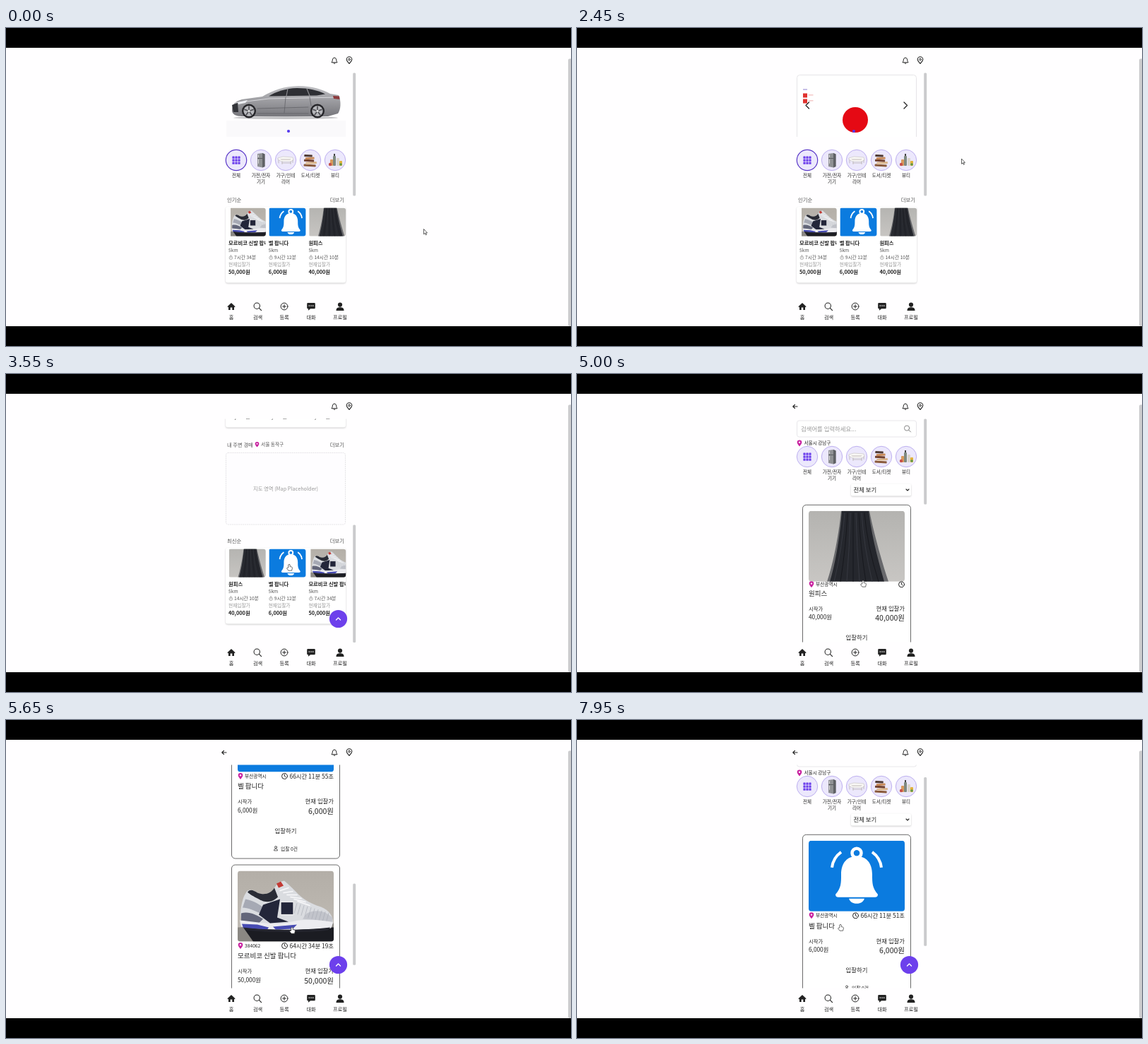
These frames come from a looping animation (800 by 450 pixels, 8 s). An HTML page:

```html
<!DOCTYPE html>
<html>
<head>
<meta charset="utf-8">
<title>Auction app</title>
<style>
  html, body { margin: 0; width: 100%; height: 100%; overflow: hidden; background: #000; }
  svg { display: block; }
  text { font-family: "Noto Sans CJK KR", "Noto Sans KR", "Noto Sans CJK", "Noto Sans", sans-serif; }
  .soft { filter: drop-shadow(0 1px 1.2px rgba(0, 0, 0, .2)); }
  .line { fill: none; stroke: #222; stroke-linecap: round; stroke-linejoin: round; }
</style>
</head>
<body>
<svg id="stage" width="800" height="450" viewBox="0 0 800 450"></svg>
<script>
const LOOP = 8000, STEP = 50;
const INK = '#222', GREY = '#555', PALE = '#999', PURPLE = '#6d40ec', PINK = '#c8219f';

// y is the visual middle of the line
const text = (x, y, s, size, fill = INK, more = '') =>
  `<text x="${x}" y="${y + size * .37}" font-size="${size}" fill="${fill}" ${more}>${s}</text>`;
const END = 'text-anchor="end"', MID = 'text-anchor="middle"', BOLD = 'font-weight="700"';
const at = (x, y, body, more = '') => `<g transform="translate(${x} ${y})" ${more}>${body}</g>`;
const use = (id, x, y, k = 1) => `<use href="#${id}" transform="translate(${x} ${y}) scale(${k})"/>`;
const path = (d, fill, more = '') => `<path d="${d}" fill="${fill}" ${more}/>`;
const rect = (x, y, w, h, fill, more = '') =>
  `<rect x="${x}" y="${y}" width="${w}" height="${h}" fill="${fill}" ${more}/>`;
const dot = (x, y, r, fill, more = '') => `<circle cx="${x}" cy="${y}" r="${r}" fill="${fill}" ${more}/>`;
const line = (d, w = 1, more = '') => `<path class="line" d="${d}" stroke-width="${w}" ${more}/>`;
const tint = color => `style="stroke:${color}"`;
const range = n => [...Array(n).keys()];

const items = {
  dress: { name: '원피스', price: '40,000원', left: '14시간 10분', place: '부산광역시', clock: [95, 10, 33] },
  bell: { name: '벨 팝니다', price: '6,000원', left: '9시간 12분', place: '부산광역시', clock: [66, 11, 55] },
  shoe: { name: '모르비코 신발 팝니다', price: '50,000원', left: '7시간 34분', place: '384062', clock: [64, 34, 19] }
};

const pictures = `
<g id="dress">
  ${rect(0, 0, 136, 100, 'url(#wall)')}
  ${path('M46 0H86C92 30 103 70 113 100H26C36 70 43 30 46 0Z', '#4a4b50', 'opacity=".75"')}
  ${path('M47 0H85C89 35 99 72 107 100H30C39 70 45 30 47 0Z', '#25272d')}
  ${range(8).map(i => line(`M${51 + i * 4} 3Q${48 + i * 5} 50 ${36 + i * 9} 100`, 1,
    tint(i % 2 ? '#17181d' : '#363840'))).join('')}
</g>
<g id="bell">
  ${rect(0, 0, 136, 100, '#0b7bdf')}
  <circle cx="68" cy="17.500" r="6.500" fill="none" stroke="#fff" stroke-width="4.500"/>
  ${path('M38 76C46 67 46 60 46 48C46 31 55 22 68 22C81 22 90 31 90 48C90 60 90 67 98 76Q98 80 94 80H42Q38 80 38 76Z', '#fff')}
  ${path('M57 82H79C77 87 73 89 68 89C63 89 59 87 57 82Z', '#fff')}
  <path d="M33 38C34 29 39 21 46 16M103 38C102 29 97 21 90 16" fill="none" stroke="#fff" stroke-width="4"/>
</g>
<g id="shoe">
  ${rect(0, 0, 136, 100, 'url(#floor)')}
  ${path('M0 80L136 74V100H0Z', '#8b8883')}
  ${path('M8 80H136V100H22Z', '#1b1c22')}
  ${path('M4 60C5 46 8 36 13 29C18 25 23 28 28 31C38 35 47 32 52 24L58 16L66 14C72 19 77 24 82 29C92 40 104 47 118 51C130 56 135 64 135 73L133 80L6 76Z', '#dadce0')}
  ${path('M14 30C18 25 23 28 28 31C38 35 47 32 52 24L57 37C48 46 38 45 30 40C22 36 17 33 14 30Z', '#2a2c36')}
  ${path('M11 40C22 42 32 48 40 54L36 62C24 56 14 52 7 52Z', '#a6a9b4')}
  ${path('M36 48L60 40L56 66L72 72L46 74L30 62Z', '#23263a')}
  ${path('M5 60C16 57 26 62 36 68L30 74L5 71Z', '#63667a')}
  ${path('M98 60C110 54 124 56 134 66L134 72L92 68Z', '#c2c4cb')}
  ${path('M55 18L61 15L65 21L58 24Z', '#c23a34')}
  ${range(6).map(i => line(`M${60 + i * 5} ${28 + i * 3}L${72 + i * 6} ${24 + i * 5}`, 1.6, tint('#f8f8fa'))).join('')}
  ${range(10).map(i => line(`M${84 + i * 5} ${46 + i * 1.500}l-4 14`, .6, tint('#a5a8b2'))).join('')}
  ${rect(61, 44, 18, 18, '#23263a', 'stroke="#eee" stroke-width="1.200"')}
  ${path('M3 70C26 72 52 78 76 72C98 67 122 70 135 73L132 81C104 83 80 84 60 83C40 83 20 82 5 79Z', '#ececf0')}
  ${path('M6 75L28 76L44 80L42 83L8 81ZM50 79L84 76L78 82L54 83Z', '#474bb2')}
  ${path('M8 80C44 85 96 84 131 80L128 84C92 88 40 87 12 84Z', '#24252e')}
</g>
<g id="car">
  <ellipse cx="396" cy="127" rx="74" ry="2" fill="#c4c4c6"/>
  ${path('M320 117C320 108 324 104 334 101L363 97C378 88 394 82.500 414 82C434 82 448 87 459 93L471 95C475 104 474 116 470 121L456 125H334C326 125 320 122 320 117Z', 'url(#silver)')}
  ${path('M372 96.500C382 90 396 85.500 412 85C429 85 441 88 452 93.500L440 95.500Z', '#2e2f34')}
  ${line('M399 86L397 96M426 86L430 96', 1.2, tint('#8d8d92'))}
  ${line('M324 106L372 100L471 98', 1, tint('#d8d8dc'))}
  ${line('M356 121H428M396 98L394 120M430 98L432 110M356 114L428 112', .7, tint('#5c5c62'))}
  ${path('M320 109L328 106L329 119L322 119Z', '#333439')}
  ${path('M328 105L342 102L339 106L329 108Z', '#eceef2')}
  ${path('M463 96L472 96.500L472.500 101L464 100Z', '#8d3a3d')}
  ${[344, 441].map(x => dot(x, 117.5, 10, '#242428') + dot(x, 117.5, 7.6, '#b5b6ba') +
    range(5).map(i => `<path d="M${x} 117.500v-7" stroke="#4b4b50" stroke-width="1.600" transform="rotate(${i * 72} ${x} 117.500)"/>`).join('') +
    dot(x, 117.5, 1.7, '#ddd')).join('')}
</g>`;

const icons = `
<g id="pin">${path('M0 4.500C-2 2-3.300.5-3.300-1.200A3.300 3.300 0 0 1 3.300-1.200C3.300.5 2 2 0 4.500Z', PINK)}${dot(0, -1.2, 1.2, '#fff')}</g>
<g id="clock"><circle r="4" class="line" stroke-width="1"/>${line('M0-2.400V.2L1.800 1.200', .9)}</g>
<g id="lens"><circle cx="-1" cy="-1" r="4" class="line" stroke-width="1"/>${line('M2 2L5 5', 1.1)}</g>
<g id="arrow">${path('M0 0V7.300L1.700 5.800L2.900 8.400L4 7.900L2.900 5.400H5Z', '#fff', 'stroke="#222" stroke-width=".7"')}</g>
<g id="hand">${path('M-1.200 5V1Q0-.8 1.200 1V3.500L3.800 4.200Q4.600 4.500 4.400 5.600L3.600 9.200H-1L-3.300 6.300Q-3.400 5.200-2.300 5.200Z', '#fff', 'stroke="#222" stroke-width=".65"')}</g>
<g id="person">${dot(0, -2.7, 3.1, INK)}${path('M-5.500 5.800C-5.500 1.500-3 .9 0 .9S5.500 1.500 5.500 5.800Z', INK)}</g>`;

const goods = [
  range(9).map(i => rect(-5.6 + i % 3 * 4, -5.4 + (i / 3 | 0) * 4, 3.2, 3.2, PURPLE, 'rx=".4"')).join(''),
  path('M-5-9L2-10L5.500-8.500V9L2 10.500L-5 9Z', '#8f9194') + path('M2-10L5.500-8.500V9L2 10.500Z', '#5f6165') +
    rect(-5, -3, 7, .8, '#4f5155') + rect(-4, -7.5, .8, 3.5, '#eee') + rect(-4, -1.2, .8, 6, '#eee'),
  path('M-11-3L-4-5L10-4L11 0L7 2L-6 2L-11-1Z', '#f9f8f6', 'stroke="#c5c1bf" stroke-width=".6"') +
    line('M-10 0V4M-5 2V5.500M7 2V5.500M10 0V3.500M-5 4H7', .8, tint('#b9b4b2')) +
    path('M-8-2L8-2L6 0H-6Z', '#dcd8d6'),
  ['#8a5a3c', '#d9b48a', '#71402e', '#c88a5a', '#4f3a34'].map((c, i) =>
    rect(-9 + i % 2 * 2, 6 - i * 3.4, 17 - i * 1.4, 3, c, `rx=".5" transform="rotate(${i % 2 ? -4 : 3})"`)).join('') +
    rect(-6, 5, 12, .8, '#f4e9da'),
  rect(-7, -1, 4, 9, '#d99a5d', 'rx="1"') + rect(-3, -6, 4, 14, '#7f8a80', 'rx="1"') + rect(-2, -9, 2, 3, '#444') +
    rect(2, -3, 4, 11, '#d9d4c8', 'rx="1"') + rect(6, 1, 4, 7, '#e2b23c', 'rx="1"') + dot(-7, 6, 2.2, '#c6504a') + dot(8, 6, 1.8, '#5d9a4b')
];
const labels = [['전체'], ['가전/전자', '기기'], ['가구/인테', '리어'], ['도서/티켓'], ['뷰티']];
const categories = (y, selected) => labels.map((rows, i) => at(326 + 35 * i, y,
  dot(0, 0, 14.7, '#ece8fc', i === selected ? 'stroke="#5a37c8" stroke-width="1.200"' : 'stroke="#b7a8ee" stroke-width=".9"') +
  goods[i] + rows.map((r, n) => text(0, 22 + n * 8.2, r, 6.5, INK, MID)).join(''))).join('');

const thumb = (id, i) => {
  const p = items[id];
  return at(315 + 56.7 * i, 254.7, `
    <g clip-path="url(#thumbClip)">${use(id, id === 'shoe' ? 3 : 1, -2.7, .45)}</g>
    ${text(0, 49.3, p.name, 7.3, INK, BOLD)}${text(0, 60, '5km', 6.7, GREY)}
    <circle cx="3.400" cy="70.500" r="2.300" fill="none" stroke="#777" stroke-width=".6"/>
    ${line('M3.400 69.200V70.600M2.700 67.200H4.100', .6, tint('#777'))}
    ${text(8, 70, p.left, 6.7, GREY)}${text(0, 80.2, '현재입찰가', 6.7, PALE)}
    ${text(0, 90.6, p.price, 7.3, INK, BOLD)}`, 'clip-path="url(#itemClip)"');
};
const listing = (y, title, ids) => at(0, y,
  text(313, 243, title, 7.3, GREY) + text(479, 243, '더보기', 7.3, GREY, END) +
  rect(311, 253, 170, 107.500, '#fff', 'rx="3" class="soft"') + ids.map(thumb).join(''));

const home = `
<g clip-path="url(#bannerClip)">
  <g id="slides">
    ${rect(312, 131, 169, 23, '#faf9fb')}<use href="#car"/>
    <g transform="translate(170 0)">
      ${rect(311.5, 66.5, 169, 95, '#fff', 'rx="4" stroke="#e6e4e8"')}
      ${dot(394, 130, 18, '#e50914')}
      ${rect(320, 86.5, 6, 1, '#8d7fd0')}
      ${[92.5, 100.5].map(y => rect(320, y, 6, 6, '#e0322f') + rect(327.5, y + 2, 7, .8, '#eb9a98')).join('')}
    </g>
  </g>
</g>
<circle id="bullet" cy="146" r="2.100" fill="#5437ee"/>
<g id="chevrons">${line('M328.500 105L324 109.500L328.500 114M463 105L467.500 109.500L463 114', 1.3)}</g>
${categories(187, 0)}
${listing(0, '인기순', ['shoe', 'bell', 'dress'])}
${text(313, 385, '내 주변 경매', 7.3, GREY)}${use('pin', 355.5, 384.8, .85)}
${text(361, 385, '서울 동작구', 6.7, GREY)}${text(479, 385, '더보기', 7.3, GREY, END)}
${rect(311.5, 396.500, 169, 101.500, '#fefdff', 'rx="3" stroke="#dedce0" stroke-width=".8" stroke-dasharray="2 1"')}
${text(396, 447, '지도 영역 (Map Placeholder)', 7.3, PALE, MID)}
${listing(278, '최신순', ['dress', 'bell', 'shoe'])}`;

const card = id => {
  const p = items[id];
  return `<g id="card-${id}">
    <rect class="frame" x="319.500" y="0" width="153" rx="5" fill="#fff" stroke="#444" stroke-width=".8"/>
    ${at(328, 8.5, use(id, 0, 0), 'clip-path="url(#photoClip)"')}
    <g class="where">${use('pin', 332, 112.5)}${text(338, 112.5, p.place, 6.7)}
      <g class="dial"><use href="#clock"/></g>${text(464, 112.5, '', 8.4, INK, END + ' class="timer"')}</g>
    <g class="rest">${text(328, 124.700, p.name, 9.5)}
      ${text(328, 146.700, '시작가', 7.3)}${text(328, 159, p.price, 8.3)}
      ${text(464, 146.200, '현재 입찰가', 8.4, INK, END)}${text(464, 160, p.price, 10.5, INK, END)}
      ${text(396, 188, '입찰하기', 8.4, INK, MID)}
      <circle cx="382" cy="211" r="1.500" class="line" stroke-width=".7"/>
      ${line('M379.500 215.500Q379.500 213 382 213T384.500 215.500Z', .7)}
      ${text(389, 213.300, '입찰 0건', 6.8)}</g>
  </g>`;
};
const search = `
${rect(311.5, 66, 169, 23, '#fff', 'rx="3" stroke="#e6e4e8" stroke-width=".9"')}
${text(317, 77.7, '검색어를 입력하세요...', 8.4, PALE)}
<g opacity=".6">${use('lens', 468, 77.5, .9)}</g>
${use('pin', 315, 98)}${text(321.5, 98, '서울시 강남구', 6.6)}
${categories(117, -1)}
${rect(388, 155.500, 85, 17, '#fff', 'rx="2" class="soft"')}
${text(391.5, 164.3, '전체 보기', 8.4)}${line('M466 163L468 165L470 163', 1.1)}
${Object.keys(items).map(card).join('')}`;

const nav = [['홈', 319], ['검색', 356.5], ['등록', 394], ['대화', 432], ['프로필', 473]]
  .map(([s, x]) => text(x, 409, s, 7.2, INK, MID)).join('') +
  at(319, 394, path('M-5.600.3L0-5L5.600.3L4.800 1.200L4 .5V5H1.300V1.500H-1.300V5H-4V.5L-4.800 1.200Z', INK)) +
  use('lens', 356.3, 394.3, 1.05) +
  at(394, 394, '<circle r="4.900" class="line" stroke-width="1"/>' + line('M-2.400 0H2.400M0-2.400V2.400', 1)) +
  at(432, 394, path('M-4.500-5H4.500Q5.800-5 5.800-3.700V2Q5.800 3.200 4.500 3.200H-1L-4 5.800V3.200H-4.500Q-5.800 3.200-5.800 2V-3.700Q-5.800-5-4.500-5Z', INK) +
    [-2.7, 0, 2.7].map(x => dot(x, -.9, .8, '#fff')).join('')) +
  use('person', 473, 394.3);

const header = at(465, 46, line('M-3.800 2.500C-2.600 1-2.800-1-2.400-2Q-1.800-4 0-4T2.400-2C2.800-1 2.600 1 3.800 2.500ZM-1 4Q0 5 1 4', 1)) +
  at(486, 45.5, line('M0 5C-2.500 2-3.800.8-3.800-1A3.800 3.800 0 0 1 3.800-1C3.800.8 2.500 2 0 5Z', 1.1) +
    '<circle cy="-1" r="1.400" class="line" stroke-width=".9"/>') +
  `<g id="back">${line('M312 46H306M308.500 43.300L305.800 46L308.500 48.700', 1.2)}</g>`;

const clip = (id, x, y, w, h, r = 0) => `<clipPath id="${id}">${rect(x, y, w, h, '#000', `rx="${r}"`)}</clipPath>`;
const fade = (id, a, b) => `<linearGradient id="${id}" x2="0" y2="1"><stop stop-color="${a}"/><stop offset="1" stop-color="${b}"/></linearGradient>`;

document.getElementById('stage').innerHTML = `
<defs>
  ${fade('wall', '#b4b3b0', '#c8c6c3')}${fade('floor', '#b3aea7', '#c2bdb6')}${fade('silver', '#c0c0c4', '#77777c')}
  ${clip('view', 300, 63.5, 191, 316)}${clip('bannerClip', 311, 66, 170, 88)}
  ${clip('thumbClip', 0, 0, 52.7, 39.7, 3)}${clip('itemClip', 0, 0, 52.7, 100)}${clip('photoClip', 0, 0, 136, 100, 4)}
  ${pictures}${icons}
</defs>
${rect(0, 28, 800, 394, '#fffeff')}
${rect(796, 43.5, 6, 378.5, '#cdcdcf', 'rx="2"')}
<g clip-path="url(#view)"><g id="home">${home}</g><g id="search">${search}</g></g>
<rect id="thumb" x="491.200" width="4" rx="1.500" fill="#cbcbcd"/>
<g id="up">${dot(470.5, 346.5, 12.6, PURPLE)}${line('M467.500 348L470.500 345L473.500 348', 1.4, tint('#fff'))}</g>
${header}${nav}
<use id="cursor"/>`;

const $ = id => document.getElementById(id);
const set = (el, attrs) => { for (const k in attrs) el.setAttribute(k, attrs[k]); };
const move = (el, x, y) => set(el, { transform: `translate(${x} ${y})` });
const show = (el, on) => set(el, { display: on ? 'inline' : 'none' });
const smooth = p => p * p * (3 - 2 * p);

// keys: [time, value, ...] rows, eased between neighbours
function track(keys, t) {
  const i = keys.findIndex(k => k[0] > t);
  if (i < 0) return keys[keys.length - 1].slice(1);
  if (!i) return keys[0].slice(1);
  const a = keys[i - 1], b = keys[i], p = smooth((t - a[0]) / (b[0] - a[0]));
  return a.slice(1).map((v, n) => v + (b[n + 1] - v) * p);
}

const POINTER = [
  [0, 591.5, 284.5], [2400, 591.5, 284.5], [2450, 544.5, 185], [2550, 544.5, 175.5], [2750, 544.5, 175.5],
  [2800, 545, 172], [2900, 545, 172], [3050, 401, 269], [3800, 401, 269], [4000, 356, 393], [4100, 356, 393],
  [4500, 405, 292], [5000, 405, 292], [5200, 405, 293], [5900, 405, 293], [6300, 405, 177], [6350, 405, 176],
  [6550, 402, 158], [6600, 400, 157], [6750, 352, 123], [7000, 352, 123], [7400, 373, 289]
];
const SCROLL_HOME = [[3000, 0], [3450, 285]];
const SCROLL_SEARCH = [[5000, 0], [5600, 460.3], [5800, 460.3], [6330, 1.3], [6350, 1.3], [6400, 0], [7800, 0], [7950, 23], [8000, 34]];
const SLIDE = [[750, 0], [1050, -170]];

function drawCards(t, filtered, timed) {
  const grow = timed ? 4 : 0, ticks = Math.floor((t - 5450) / 525);
  Object.keys(items).forEach((id, i) => {
    const g = $('card-' + id), on = !filtered || id === 'bell', pick = c => g.querySelector('.' + c);
    show(g, on);
    if (!on) return;
    const [h, m, s] = items[id].clock;
    move(g, 0, 185.3 + (filtered ? 0 : i * (236 + grow)));
    set(pick('frame'), { height: 227 + grow });
    move(pick('where'), 0, grow / 2);
    move(pick('rest'), 0, grow);
    move(pick('dial'), timed ? 394.5 : 459.5, 112.5);
    pick('timer').textContent = timed ? `${h}시간 ${m}분 ${s - ticks}초` : '';
  });
}

function draw(t) {
  const atHome = t < 4050, filtered = t >= 7000;
  const timed = t >= 5100 && !filtered || t >= 7400;
  const scroll = track(atHome ? SCROLL_HOME : SCROLL_SEARCH, t)[0];

  show($('home'), atHome);
  show($('search'), !atHome);
  show($('back'), !atHome);
  show($('up'), scroll > 0);
  move($(atHome ? 'home' : 'search'), 0, -scroll);

  if (atHome) {
    move($('slides'), track(SLIDE, t)[0], 0);
    set($('bullet'), { cx: t < 800 ? 400 : 392 });
    show($('chevrons'), t >= 2450);
    set($('thumb'), { y: 63.5 + scroll / 285 * 150, height: 174 - scroll / 285 * 7.5 });
  } else {
    drawCards(t, filtered, timed);
    const full = filtered ? 418 : timed ? 866 : 825;
    set($('thumb'), { y: 63.5 + scroll * 316 / full, height: 316 * 316 / full });
  }

  const hand = t >= 3050 && t < 5950 || t >= 6700;
  set($('cursor'), { href: hand ? '#hand' : '#arrow' });
  move($('cursor'), ...track(POINTER, t));
}

function tick() {
  draw(Math.floor(performance.now() % LOOP / STEP) * STEP);
  requestAnimationFrame(tick);
}
tick();
</script>
</body>
</html>
```
